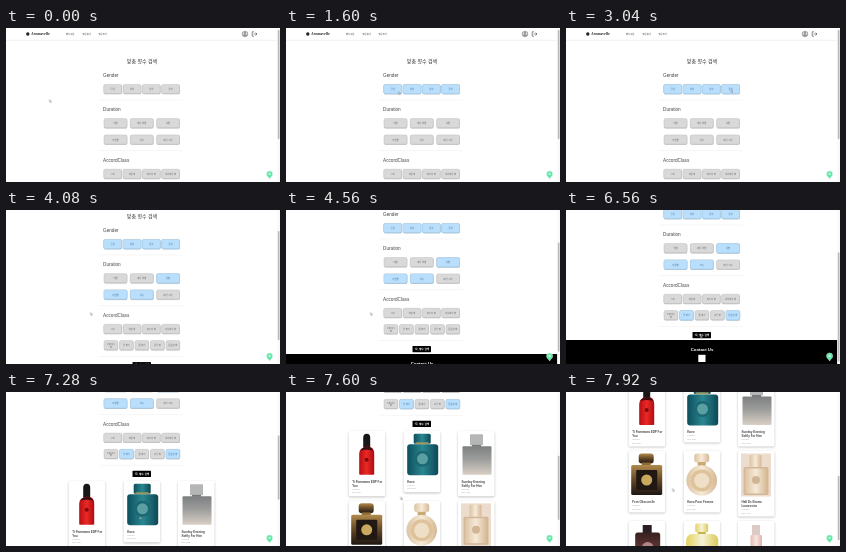
These frames come from a looping animation (274x154 px, 8 s). An HTML page:

```html
<!DOCTYPE html>
<html lang="ko">
<head>
<meta charset="utf-8">
<title>맞춤 향수 검색</title>
<style>
html, body { margin: 0; width: 100%; height: 100%; overflow: hidden; background: #fff; }
svg { display: block; width: 100vw; height: 100vh; }
text { font-family: "Noto Sans CJK KR", "Noto Sans CJK", "Noto Sans KR", sans-serif; fill: #333; }
.mid { text-anchor: middle; }
.brand { font: italic bold 4px "Liberation Serif", "Noto Serif", serif; fill: #222; }
.nav { font-size: 2.3px; font-weight: 500; }
.label { font: 4.7px "Liberation Sans", Arial, sans-serif; fill: #444; }
.btn rect { fill: #d9d9d9; stroke: #b9b9b9; stroke-width: .45; }
.btn .edge { fill: #bdbdbd; stroke: none; }
.btn text { font-size: 2.3px; fill: #666; }
.on rect { fill: #b9dffc; stroke: #a2c9e6; }
.on .edge { fill: #a3c6e0; stroke: none; }
.on text { fill: #3f74a3; }
.name { font: bold 3px "Liberation Sans", Arial, sans-serif; fill: #444; }
.note { font: 2px "Liberation Sans", Arial, sans-serif; fill: #aaa; }
.contact { font: bold 4.3px "Liberation Sans", Arial, sans-serif; fill: #fff; }

#page { animation: scroll 8s linear infinite; }
#cursor { animation: point 8s ease-in-out infinite; }
#thumb { animation: thumb 8s linear infinite; }
.on, #results, #footer { animation: 8s step-end infinite; }
.g { animation-name: pickG; }
.d3 { animation-name: pickD3; }
.e2 { animation-name: pickE2; }
.e1 { animation-name: pickE1; }
.a2 { animation-name: pickA2; }
.a5 { animation-name: pickA5; }
#results { animation-name: show; }
#footer { animation-name: hide; }

@keyframes pickG { 0% { opacity: 0 } 16%, 100% { opacity: 1 } }
@keyframes pickD3 { 0% { opacity: 0 } 41%, 100% { opacity: 1 } }
@keyframes pickE2 { 0% { opacity: 0 } 42.5%, 100% { opacity: 1 } }
@keyframes pickE1 { 0% { opacity: 0 } 44%, 100% { opacity: 1 } }
@keyframes pickA2 { 0% { opacity: 0 } 69%, 100% { opacity: 1 } }
@keyframes pickA5 { 0% { opacity: 0 } 76%, 100% { opacity: 1 } }
@keyframes show { 0% { opacity: 0 } 86%, 100% { opacity: 1 } }
@keyframes hide { 0% { opacity: 1 } 86%, 100% { opacity: 0 } }
@keyframes scroll {
  0%, 46% { transform: translateY(0) }
  54%, 58% { transform: translateY(-43px) }
  62%, 89% { transform: translateY(-57px) }
  91% { transform: translateY(-100px) }
  99%, 100% { transform: translateY(-200px) }
}
@keyframes thumb {
  0%, 46% { transform: translateY(2px); height: 109px }
  54%, 58% { transform: translateY(32.5px); height: 109px }
  62%, 85.99% { transform: translateY(42.5px); height: 109px }
  86%, 89% { transform: translateY(25.5px); height: 64px }
  91% { transform: translateY(43.5px); height: 64px }
  99%, 100% { transform: translateY(84px); height: 64px }
}
@keyframes point {
  0%, 2% { transform: translate(43.5px, 71.5px) }
  10% { transform: translate(93px, 74px) }
  15%, 23% { transform: translate(112.5px, 63.5px) }
  33%, 38% { transform: translate(165px, 61.5px) }
  40.5%, 41% { transform: translate(163px, 96px) }
  42.5% { transform: translate(138px, 111px) }
  44%, 45% { transform: translate(111px, 111px) }
  50%, 60% { transform: translate(84.5px, 102.5px) }
  65% { transform: translate(114px, 46px) }
  68%, 70% { transform: translate(118px, 106px) }
  75%, 77% { transform: translate(167px, 106px) }
  81%, 90% { transform: translate(134.5px, 125.5px) }
  98%, 100% { transform: translate(106.5px, 96.5px) }
}
</style>
</head>
<body>
<svg viewBox="0 0 274 154" preserveAspectRatio="none">
  <defs>
    <linearGradient id="red"><stop stop-color="#b80d12"/><stop offset=".5" stop-color="#ea2a26"/><stop offset="1" stop-color="#b00a10"/></linearGradient>
    <linearGradient id="teal"><stop stop-color="#0d4f5c"/><stop offset=".5" stop-color="#2a8791"/><stop offset="1" stop-color="#0d4855"/></linearGradient>
    <linearGradient id="smoke" x2="0" y2="1"><stop stop-color="#7d8081"/><stop offset=".45" stop-color="#9c9d9b"/><stop offset="1" stop-color="#d9cfc6"/></linearGradient>
    <linearGradient id="gold"><stop stop-color="#b08d4a"/><stop offset=".5" stop-color="#efdfae"/><stop offset="1" stop-color="#b08b48"/></linearGradient>
    <linearGradient id="amber" x2="0" y2="1"><stop stop-color="#b08a4c"/><stop offset=".45" stop-color="#6b4c27"/><stop offset="1" stop-color="#1d1612"/></linearGradient>
    <linearGradient id="cream"><stop stop-color="#dcc3a2"/><stop offset=".5" stop-color="#f6ead8"/><stop offset="1" stop-color="#d5b894"/></linearGradient>
    <linearGradient id="lemon"><stop stop-color="#e3d25f"/><stop offset=".5" stop-color="#f6f2d8"/><stop offset="1" stop-color="#dccb58"/></linearGradient>
    <linearGradient id="wine" x2="0" y2="1"><stop stop-color="#38201f"/><stop offset="1" stop-color="#8d5152"/></linearGradient>
    <linearGradient id="pink"><stop stop-color="#e3bdb8"/><stop offset=".5" stop-color="#f8e4df"/><stop offset="1" stop-color="#deb4ae"/></linearGradient>
    <filter id="soft" x="-20%" y="-20%" width="140%" height="140%"><feGaussianBlur stdDeviation="1"/></filter>
  </defs>

  <g id="page">
    <circle cx="21.8" cy="6" r="1.7" fill="#222"/>
    <text class="brand" x="25" y="7.2">Aromavelle</text>
    <text class="nav" x="60" y="6.9">향수추천</text>
    <text class="nav" x="76.6" y="6.9">향수찾기</text>
    <text class="nav" x="92.6" y="6.9">향수후기</text>
    <g fill="none" stroke="#777" stroke-width=".6">
      <circle cx="239" cy="6" r="2.8" fill="#ddd"/>
      <circle cx="239" cy="5.1" r="1" fill="#888" stroke="none"/>
      <path d="M237.1 7.9a1.9 1.6 0 0 1 3.8 0z" fill="#888" stroke="none"/>
      <path d="M248 3.8h-1.8v4.4h1.8M247.6 6h3.4M249.6 4.6L251 6l-1.4 1.4" stroke="#444"/>
    </g>
    <path d="M0 12.3H271" stroke="#e6e6e6" stroke-width=".6"/>
    <text class="mid" x="136" y="35" font-size="5" font-weight="500">맞춤 향수 검색</text>
    <text class="label" x="97" y="48.7">Gender</text>
    <text class="label" x="97" y="82.8">Duration</text>
    <text class="label" x="97" y="133.7">AccordClass</text>
    <path d="M93 72H177M93 122.6H177M93 173.5H177" stroke="#ececec" stroke-width=".5"/>
    <g id="buttons"></g>
    <g id="footer">
      <rect y="187" width="271.3" height="25"/>
      <text class="contact mid" x="136" y="198.2">Contact Us</text>
      <rect x="132.3" y="201.8" width="7.2" height="7.2" fill="#fff"/>
    </g>
    <g id="results"></g>
    <rect x="126.5" y="179" width="18.5" height="6.2" rx=".6"/>
    <g fill="none" stroke="#fff" stroke-width=".5"><circle cx="130.2" cy="181.7" r=".9"/><path d="M130.9 182.4l1 1"/></g>
    <text class="mid" x="138.2" y="183" font-size="2.5" font-weight="700" style="fill:#fff">향수 검색</text>
  </g>

  <rect x="271.3" width="2.7" height="154" fill="#f8f8f8"/>
  <rect id="thumb" x="271.8" width="1.7" height="109" rx=".5" fill="#b9b9b9"/>
  <path d="M263.6 151c-.6-1.6-3.1-2.4-3.1-5a3.1 3.1 0 0 1 6.2 0c0 2.6-2.5 3.4-3.1 5z" fill="#62e6a8" stroke="#e3faef" stroke-width=".4"/>
  <circle cx="263.6" cy="146" r="1.2" fill="#b5f5d5"/>
  <path id="cursor" d="M0 0v2.6l.65-.55.5 1.1.45-.2-.48-1.05h.85z" fill="#fff" stroke="#444" stroke-width=".3"/>
</svg>
<script>
const byId = id => document.getElementById(id);
const rect = (x, y, w, h, fill, r = 0) =>
  `<rect x="${x}" y="${y}" width="${w}" height="${h}" rx="${r}" fill="${fill}"/>`;
const disc = (x, y, r, fill) => `<circle cx="${x}" cy="${y}" r="${r}" fill="${fill}"/>`;
const shape = (d, fill) => `<path d="${d}" fill="${fill}"/>`;

function face(x, y, w, text, cls) {
  const lines = text.split("|");
  const top = y + 5.7 - (lines.length - 1) * 1.4;
  const words = lines.map((s, i) =>
    `<text class="mid" x="${x + w / 2}" y="${top + i * 2.8}">${s}</text>`).join("");
  return `<g class="btn ${cls}"><rect class="edge" x="${x + .2}" y="${y + .7}" width="${w}" height="9.2" rx="1.5"/>` +
    `<rect x="${x}" y="${y}" width="${w}" height="9.2" rx="1.5"/>${words}</g>`;
}

// Each row: top, left, step, width, labels, pick class per label.
const rows = [
  [56.4, 97.7, 19.3, 18, ["무관", "여성", "남성", "중성"], ["g", "g", "g", "g"]],
  [90.6, 98, 26.3, 23, ["약함", "매우 약함", "강함"], [, , "d3"]],
  [106.9, 98, 26.3, 23, ["어정쩡", "지속", "매우 지속"], ["e1", "e2"]],
  [141.3, 97.7, 19.3, 18, ["시트", "과일 향", "파우더 향", "아로마틱 향"], []],
  [157.5, 98, 15.5, 13.8, ["스파이시|향", "꽃 향기", "풀 향기", "나무 향", "달콤한 향"], [, "a2", , , "a5"]]
];
byId("buttons").innerHTML = rows.map(([y, x, step, w, labels, picks]) =>
  labels.map((s, i) => face(x + i * step, y, w, s, "") +
    (picks[i] ? face(x + i * step, y, w, s, "on " + picks[i]) : "")).join("")).join("");

const cards = [
  [["Ti Fiammara EDP For", "You"],
    shape("M14.5 17V7q0-4 3.5-4t3.5 4v10z", "#191617") +
    shape("M10.5 43V23q0-6 7.5-7t7.5 7v20q0 1-1 1h-13q-1 0-1-1z", "url(#red)") +
    shape("M11.5 20q2-3.500 6.500-4t6.500 4q-6.500-2-13 0z", "#3a0d10") + disc(18, 29, 2, "#7d0a0d")],
  [["Kavo"],
    rect(10, 3, 17, 10, "url(#teal)", 1.5) + rect(12, 11.5, 13, 2, "#a9975a") +
    rect(3.5, 13.5, 31, 31, "url(#teal)", 3) + disc(18.8, 28, 8, "#1b6872") + disc(18.8, 28, 5.5, "#5a9fa2")],
  [["Sunday Evening", "Softly For Him"],
    rect(12, 3.500, 13, 11, "#b5b7b7", .6) + rect(14, 14, 9, 2, "#777a7b") +
    rect(4.5, 15.5, 29, 28.5, "url(#smoke)", 1)],
  [["Fern Obscurelle"],
    rect(10, 2.5, 15, 10, "url(#amber)", 3) + rect(13, 11.5, 9, 3, "#8d6c35") +
    rect(2.5, 14, 31, 30, "url(#amber)", 1.5) + rect(7.5, 19, 21, 20, "#211813", 1) + disc(18, 29, 5.5, "#c9a960")],
  [["Kavo Pour Femme"],
    rect(10.5, 2.5, 15, 9, "url(#cream)", 3) + rect(14, 11, 8, 4, "#cba974") +
    disc(18, 29.5, 15.3, "url(#cream)") + disc(18, 29.5, 11, "#dec39a") + disc(18, 29.5, 7.500, "#efdfc6")],
  [["Hall De Brume", "Lumessine"],
    rect(3, 2.5, 30, 43, "#ecdccd") + rect(11.5, 4, 12, 12, "url(#cream)", .8) +
    rect(5.5, 16, 25, 28, "#d3b799", 1.5) + rect(7, 17.5, 22, 25, "url(#cream)", 1) + disc(18, 29, 4, "#d2b594")],
  [["Noir Velessa"],
    rect(14, 4, 9, 8, "#2b2021", .6) + rect(6.5, 11.5, 25, 34, "url(#wine)", 2.5) + disc(19, 27, 6, "#b58586")],
  [["Lumiora"],
    rect(11.5, 2.5, 13, 9, "url(#lemon)", 2) + rect(14, 11, 8, 3, "#c6b44a") +
    rect(2.5, 13, 32, 32, "url(#lemon)", 6)],
  [["Rosellane"],
    rect(14, 4, 8, 10, "#dccac6", .6) + rect(12.5, 14, 11.5, 31, "url(#pink)", 1)]
];
byId("results").innerHTML = cards.map(([names, bottle], i) => {
  const x = [62.7, 117.7, 172][i % 3], y = 189 + 70 * Math.floor(i / 3);
  const extra = (names.length - 1) * 4, height = 61.5 + extra;
  const title = names.map((s, n) => `<text class="name" x="3.5" y="${52 + n * 4}">${s}</text>`).join("");
  const notes = ["Perfume", "EDP 50ml"].map((s, n) =>
    `<text class="note" x="3.5" y="${55.4 + extra + n * 3.2}">${s}</text>`).join("");
  return `<g transform="translate(${x} ${y})">` +
    `<rect y=".8" width="36.5" height="${height}" rx="1.5" fill="#000" opacity=".25" filter="url(#soft)"/>` +
    rect(0, 0, 36.5, height, "#fff", 1.5) + bottle + title + notes + "</g>";
}).join("");
</script>
</body>
</html>
```
